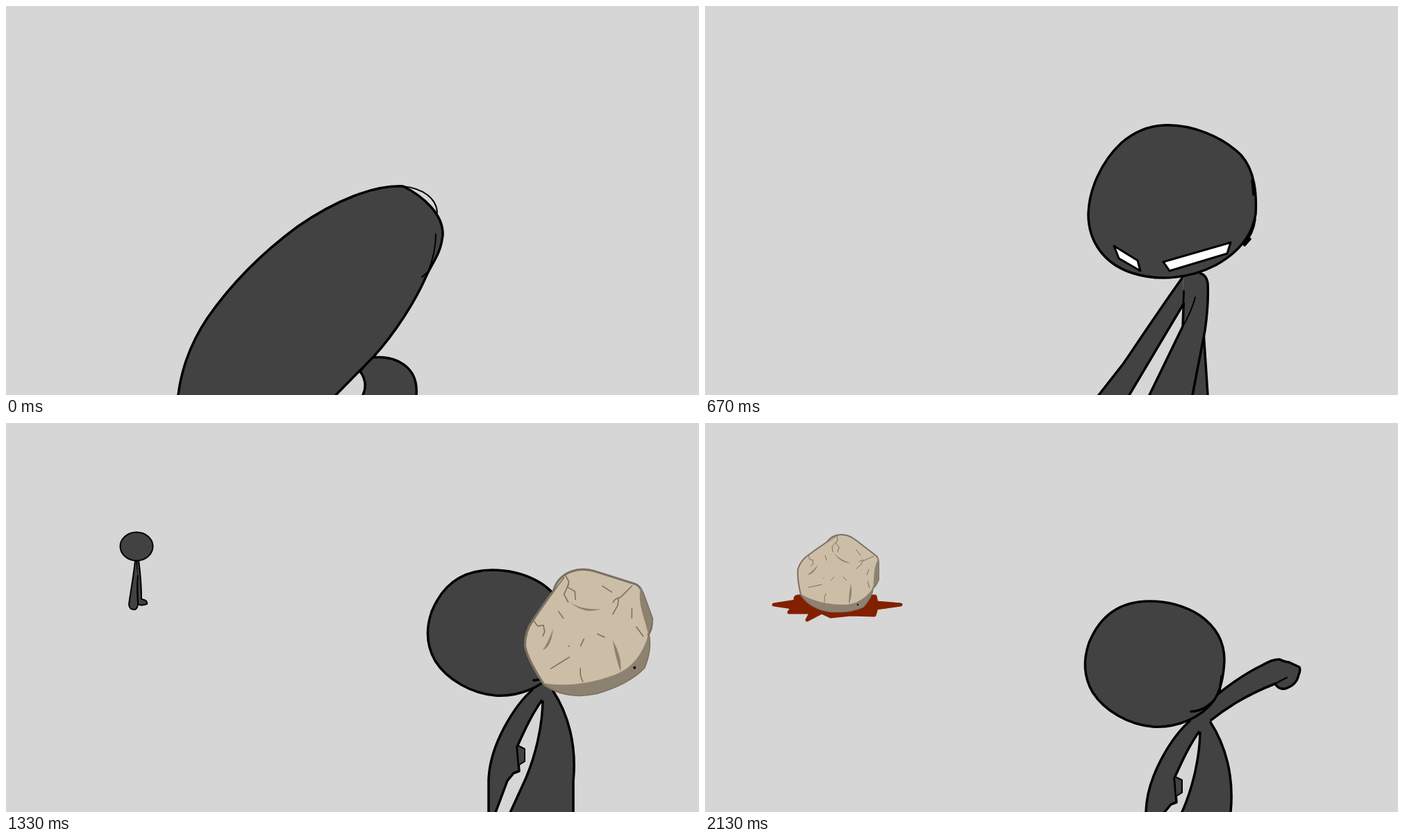
Animation, 998 px wide and 561 px high, one loop 3360 ms. Source, as an HTML page:

```html
<!DOCTYPE html>
<html lang="en">
<head>
<meta charset="utf-8">
<title>Rock throw</title>
<style>
  html, body { margin: 0; width: 100%; height: 100%; overflow: hidden; background: #d6d6d6; }
  svg { display: block; width: 100%; height: 100%; }
  .ink { fill: #424242; stroke: #000; stroke-width: 3.5; stroke-linecap: round; stroke-linejoin: round; }
  .thin { stroke-width: 2; }
  .line { fill: none; }
  .join { fill: #424242; stroke: none; }
  .eye { fill: #fff; stroke-width: 3; }
  .stone { fill: #ccbda6; stroke: #7b7063; stroke-width: 2; stroke-linejoin: round; }
  .shade { fill: #8d8270; }
  .cracks { fill: none; stroke: #7b7063; stroke-width: 1; stroke-linecap: round; stroke-linejoin: round; }
  .blood { fill: #832000; stroke: #832000; stroke-width: 5; stroke-linejoin: round; }
</style>
</head>
<body>
<svg viewBox="0 0 998 561">
  <defs>
    <g id="bigHead" class="ink">
      <path d="M757 160C800 160 845 190 868 228C885 257 884 287 877 308C865 350 835 374 790 381C735 385 685 363 655 330C640 313 633 290 633 272C637 233 665 200 695 178C717 164 737 160 757 160Z"/>
      <path class="line" d="M877 290L874 306M861 341Q853 354 834 363M858 348L842 363"/>
    </g>
  </defs>

  <path id="blood" class="blood" d="M99 262L131 257Q128 251 134 250H245L247 259 282 262 247 267 244 277 210 276 181 279 168 273 147 284 153 273H121L126 266Z"/>

  <g id="walker" class="ink">
    <path id="backLeg" class="thin" d="M101 198L104 198C107 220 108 240 108 254Q117 255 116 261Q105 265 103 260Z"/>
    <path id="frontLeg" class="thin" d="M99 198C97 220 92 245 90 262Q91 270 99 269Q103 267 103 260Q101 240 103 220"/>
    <ellipse class="thin" cx="101" cy="178" rx="23.5" ry="20.5"/>
  </g>

  <g id="smear" class="ink">
    <path d="M525 507C562 503 594 520 591 561V760H490L514 561C519 550 518 538 510 527Z"/>
    <path d="M200 760Q238 680 248 561C253 520 268 483 290 450C324 401 370 355 420 318C475 280 530 258 572 260C600 274 630 300 629 330C626 358 615 368 605 390C590 425 560 472 530 505L475 561 280 760"/>
    <path class="line thin" d="M572 260C600 263 620 277 621 298M619 329Q619 355 608 383L599 391"/>
  </g>

  <g id="scream" class="ink">
    <path d="M718 122C728 106 740 95 754 97C765 102 774 105 783 106L810 107Q814 109 811 115L808 124"/>
    <path d="M687 303C678 335 673 365 671 395Q670 411 680 413Q690 416 697 411C712 380 722 360 731 340L726 335 728 322"/>
    <path class="line" d="M699 373L728 328"/>
    <path d="M738 330C725 352 712 385 697 411C672 455 647 510 630 561L612 620H680L692 561C705 500 722 425 747 358"/>
    <path class="join" d="M736 328H766L752 365 744 362Z"/>
    <path d="M822 248C850 232 864 205 864 165C845 140 820 118 785 112C750 107 715 122 690 140C660 163 641 192 641 225C642 262 663 292 692 310C720 327 760 336 798 333"/>
    <path d="M747 350C750 390 757 430 763 450Q766 457 775 458Q795 462 808 455C820 430 840 385 850 358C862 325 878 290 890 262Q905 240 913 222Q918 212 912 207L895 196Q899 175 894 165Q892 160 884 157L845 144 864 165C864 205 850 232 822 248C814 270 806 300 798 335C794 355 788 375 782 389C780 372 772 350 765 330"/>
    <path class="line thin" d="M847 365Q838 395 826 422M808 455L815 451M896 245L884 268"/>
    <path fill="#b68c7b" d="M715 152C745 151 765 154 780 157Q797 161 802 178C810 200 810 220 805 240Q800 262 787 285L773 302Q768 297 760 291L706 259 670 243Q661 238 667 228Z"/>
    <path fill="#a06350" d="M706 259C712 246 735 247 748 256Q762 266 775 270Q787 272 787 287L773 302Q768 297 760 291Z"/>
    <path class="line thin" d="M699 148Q706 152 716 152"/>
  </g>

  <g id="look" class="ink">
    <path d="M688 391C660 430 630 475 603 515L567 561 530 608H582L611 561 690 428"/>
    <path d="M718 470L724 561V620H690L702 561Z"/>
    <path d="M690 411L688 462 640 561 610 620H690L702 561C710 520 716 490 720 468C724 440 725 420 724 400Q722 386 710 385"/>
    <path class="join" d="M688 390L712 384 712 420 690 428Z"/>
    <path class="line thin" d="M690 411L688 462M706 420Q701 440 688 462"/>
    <path d="M660 172C700 170 745 188 772 215C790 235 795 265 793 300C788 330 770 355 735 374C700 392 655 398 615 385C575 372 552 340 552 300C553 265 570 225 600 197C620 180 640 173 660 172Z"/>
    <path class="line" d="M788 251L790 272M792 308Q789 329 776 343M785 336L777 345"/>
    <path class="eye" d="M589 346L623 367 627 382 596 364ZM660 369L757 341 752 357 669 382Z"/>
  </g>

  <g id="lift" class="ink">
    <path d="M742 382C725 415 705 450 687 478L597 561 550 605H630L668 561 697 520 742 398"/>
    <path d="M768 384L830 450 800 490 792 469 759 404"/>
    <path d="M742 398C730 430 705 490 685 561L675 610H738L742 561C745 500 752 450 759 404"/>
    <path class="join" d="M742 380H769L759 408 742 400Z"/>
    <use href="#bigHead"/>
    <path class="line thin" d="M664 333C680 329 700 331 714 329L700 330"/>
  </g>

  <g id="aim" class="ink">
    <path d="M672 364C700 369 735 374 768 382L785 403 672 393"/>
    <path d="M815 391L880 460 850 492 846 485C830 455 815 425 797 405"/>
    <path d="M788 400C765 430 730 470 710 515L688 561 665 610H748L760 561C772 510 785 465 802 412"/>
    <path class="join" d="M766 382L816 389 802 413 785 402Z"/>
    <use href="#bigHead" x="38.5" y="7.5"/>
    <path d="M656 372Q658 395 648 403Q640 412 643 418Q660 423 677 416Q680 405 672 395L670 371Z"/>
    <path d="M597 369Q605 364 625 364Q640 358 650 362L657 375Q655 395 648 403Q630 408 615 400Q605 404 597 397Q592 383 597 369Z"/>
    <path d="M640 352Q648 344 656 345Q668 346 674 353Q672 368 664 371Q652 374 645 368Q638 360 640 352Z"/>
  </g>

  <g id="throw" class="ink">
    <path d="M727 430C750 465 762 510 757 561V620H660L687 561C703 525 713 480 713 443"/>
    <path d="M700 428C672 452 636 510 635 561V620H640L662 561 671 550 679 547 676 512C686 490 697 465 713 443"/>
    <path class="thin" d="M677 510L687 515V533L679 538"/>
    <path d="M706 420C735 392 770 365 803 349Q818 340 828 341Q833 344 841 345L856 352Q858 356 855 363Q852 378 836 383Q826 385 821 376C790 388 755 407 727 430"/>
    <path class="line thin" d="M821 376L838 367"/>
    <path class="join" d="M698 428L712 416 728 429 713 446Z"/>
    <path d="M640 257C665 257 690 263 712 277C735 293 748 315 748 342C747 365 743 385 733 400C715 425 680 440 645 438C610 435 575 415 558 388C545 365 545 340 553 317C568 280 595 257 640 257Z"/>
    <path class="line" d="M744 365L741 387M733 400Q717 416 700 416"/>
  </g>

  <g id="rock">
    <g transform="translate(-193 -217)">
      <path class="stone" d="M175 172Q183 161 196 161Q207 161 216 168L246 191Q250 194 250 202V226Q246 236 242 238Q240 252 228 265Q210 274 180 272Q152 268 138 248Q132 222 134 210Q138 198 148 191Q163 180 175 172Z"/>
      <path class="shade" d="M138 247Q165 262 200 262Q225 262 242 238Q240 252 228 265Q210 274 180 272Q152 268 138 247ZM250 195Q244 206 243.5 218L242 238 250 227ZM182 178Q186 195 210 202Q190 202 182 178ZM163 204Q156 219 147.5 219Q155 214 163 204ZM210 232Q213 249 207 261Q207 246 210 232Z"/>
      <path class="cracks" d="M176 172L188 164M190 163L191 169 188 173 193 179 191 186M190 171L183 178 184 186M149 191L151 197 156 198 155 204 152 207M243 192L230 198Q225 197 222 200M228 198L225 204 218 210M218 183L224 191M173 191L175 198M186 222L181 227M199 222L204 227M236 211L233 219M149 237L168 233M174 246Q171 252 172 258M234 228L237 238M171 223.5H171.5"/>
      <circle cx="220" cy="262" r="1.2"/>
    </g>
  </g>
</svg>
<script>
  const LOOP = 3360, TICK = 1000 / 15, LAST_TICK = 32, IMPACT = 22;
  const el = id => document.getElementById(id);
  const clamp = (v, lo, hi) => Math.min(hi, Math.max(lo, v));

  // Each pose eases from one offset to another between two ticks.
  const poses = [
    { id: 'smear', start: 0, end: 2, from: [0, 0], to: [250, -170] },
    { id: 'scream', start: 2, end: 3, from: [-3, -10], to: [0, 0], shake: 2 },
    { id: 'look', start: 6, end: 10, from: [70, -45], to: [0, 0] },
    { id: 'lift', start: 12, end: 14, from: [-50, 14], to: [0, 0] },
    { id: 'aim', start: 17, end: 18, from: [-14, -4], to: [0, 0] },
    { id: 'throw', start: 20, end: 22, from: [60, -45], to: [0, 0] }
  ];

  // tick, x, y, scale, angle
  const rockPath = [
    [12, 880, 690, 1.826, 0],
    [14, 858, 532, 1.826, 0],
    [16, 870, 529, 1.826, 0],
    [18, 948, 515, 1.826, 0],
    [19, 960, 518, 1.826, 0],
    [20, 840, 300, 1.6, -20],
    [22, 180, 208, 1, -36],
    [24, 172, 207, 1, -50],
    [26, 177, 208, 1, -40],
    [29, 195, 217, 1, 4],
    [30, 195, 217, 1, 5],
    [32, 193, 217, 1, 0]
  ];

  const show = (id, on) => { el(id).style.display = on ? '' : 'none'; };
  const place = (id, value) => el(id).setAttribute('transform', value);

  function drawPose(tick) {
    const current = poses.filter(p => p.start <= tick).pop();
    poses.forEach(p => show(p.id, p === current));
    const { id, start, end, from, to, shake = 0 } = current;
    const left = (1 - clamp((tick - start) / (end - start), 0, 1)) ** 2;
    const [x, y] = to.map((v, i) => v + (from[i] - v) * left);
    const tremble = tick > end ? shake * (-1) ** tick : 0;
    place(id, `translate(${x + tremble} ${y})`);
  }

  function drawWalker(tick) {
    show('walker', tick >= 11 && tick < IMPACT);
    const stride = Math.min(tick, 18) - 14;
    const swing = 14 * Math.sin(stride * Math.PI / 2);
    place('walker', `translate(${stride * 21.75} 0)`);
    place('frontLeg', `rotate(${swing} 102 198)`);
    place('backLeg', `rotate(${-swing} 102 198)`);
  }

  function drawRock(tick) {
    show('rock', tick >= rockPath[0][0]);
    const next = Math.max(1, rockPath.findIndex(key => key[0] >= tick));
    const a = rockPath[next - 1], b = rockPath[next];
    const p = clamp((tick - a[0]) / (b[0] - a[0]), 0, 1);
    const [, x, y, scale, angle] = a.map((v, i) => v + (b[i] - v) * p);
    place('rock', `translate(${x} ${y}) rotate(${angle}) scale(${scale})`);
  }

  function render() {
    const time = performance.now() % LOOP;
    const tick = Math.min(LAST_TICK, Math.floor((time + 4) / TICK));
    drawPose(tick);
    drawWalker(tick);
    drawRock(tick);
    show('blood', tick >= IMPACT);
    requestAnimationFrame(render);
  }
  render();
</script>
</body>
</html>
```
